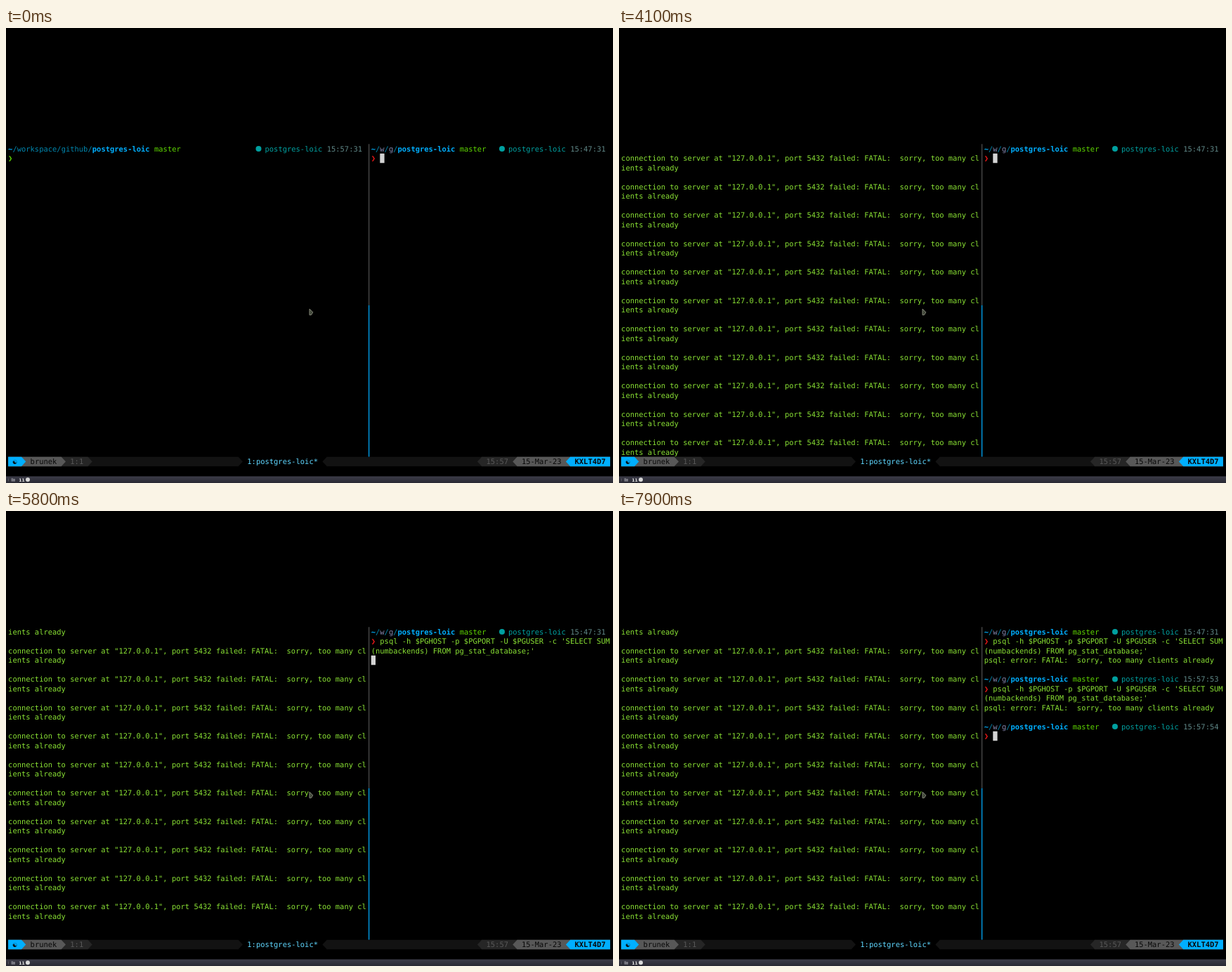
Animation, 864 px wide and 648 px high, one loop 8000 ms. Source, as an HTML page with a canvas:

```html
<!DOCTYPE html>
<html lang="en">
<head>
<meta charset="utf-8">
<title>Terminal session</title>
<style>
  html, body { margin: 0; width: 100%; height: 100%; overflow: hidden; background: #000; }
  canvas { display: block; width: 864px; height: 648px; }
</style>
</head>
<body>
<canvas id="stage" width="864" height="648"></canvas>
<script>
const ctx = document.getElementById('stage').getContext('2d');

// Character grid of the terminal
const CW = 6.3, RH = 13.5, X0 = 3.1, Y0 = 165.25;
const ROWS = 33, RIGHT = 82, STATUS = 33;
const SIZE = CW / 0.60205;
const FAMILY = '"DejaVu Sans Mono", "DejaVu Sans", monospace';
const LOOP = 8000, STEP = 100;

const C = {
  blue: '#00afff', path: '#0087af', short: '#8787af', branch: '#5fd700',
  env: '#00a0a0', clock: '#5f8787', text: '#8ae234', hint: '#666666',
  error: '#f01818', cursor: '#d3d3d3', rule: '#444444',
  g1: '#121212', g2: '#262626', g4: '#585858', ink: '#080808', tab: '#5fd7ff'
};

const MESSAGE = [
  'connection to server at "127.0.0.1", port 5432 failed: FATAL:  sorry, too many cl',
  'ients already',
  ''
];
const QUERY = ["psql -h $PGHOST -p $PGPORT -U $PGUSER -c 'SELECT SUM",
               "(numbackends) FROM pg_stat_database;'"];
const REFUSED = 'psql: error: FATAL:  sorry, too many clients already';

// Time in ms and number of output lines written by then
const OUTPUT = [[2700, 2], [4100, 169], [5300, 312], [6100, 408], [7100, 527], [7700, 600]];
// Blocks whose blank lines arrive late: first block, count
const LATE = [[90, 3], [127, 2], [130, 2]];

const colX = col => X0 + col * CW;
const rowY = row => Y0 + row * RH;

function text(col, row, str, color, bold) {
  ctx.font = (bold ? 'bold ' : '') + SIZE + 'px ' + FAMILY;
  ctx.fillStyle = color;
  ctx.fillText(str, colX(col), rowY(row) + 10.4);
}

function cursor(col, row) {
  ctx.fillStyle = C.cursor;
  ctx.fillRect(colX(col), rowY(row), CW, RH);
}

function fill(color, points) {
  ctx.fillStyle = color;
  ctx.beginPath();
  points.forEach(([x, y]) => ctx.lineTo(x, y));
  ctx.closePath();
  ctx.fill();
}

function disc(x, y, r, color) {
  ctx.fillStyle = color;
  ctx.beginPath();
  ctx.arc(x, y, r, 0, Math.PI * 2);
  ctx.fill();
}

function envMark(col, row, name, time) {
  disc(colX(col) + 3.6, rowY(row) + 6.75, 4, C.env);
  text(col + 2, row, name, C.env);
  text(col + 16, row, time, C.clock);
}

function leftPrompt() {
  text(0, 0, '~', C.blue, true);
  text(1, 0, '/workspace/github/', C.path);
  text(19, 0, 'postgres-loic', C.blue, true);
  text(33, 0, 'master', C.branch);
  envMark(56, 0, 'postgres-loic', '15:57:31');
  text(0, 1, '❯', C.branch);
}

function rightPrompt(row, time) {
  text(RIGHT, row, '~', C.blue, true);
  text(RIGHT + 1, row, '/ /', C.path);
  text(RIGHT + 2, row, 'w g', C.short);
  text(RIGHT + 5, row, '/', C.path);
  text(RIGHT + 6, row, 'postgres-loic', C.blue, true);
  text(RIGHT + 20, row, 'master', C.branch);
  envMark(RIGHT + 29, row, 'postgres-loic', time);
  text(RIGHT, row + 1, '❯', C.error);
}

function linesAt(t) {
  if (t <= OUTPUT[0][0]) return OUTPUT[0][1];
  for (let i = 1; i < OUTPUT.length; i++) {
    const [ta, a] = OUTPUT[i - 1], [tb, b] = OUTPUT[i];
    if (t <= tb) return Math.round(a + (b - a) * (t - ta) / (tb - ta));
  }
  return OUTPUT[OUTPUT.length - 1][1];
}

// Which part of the message (0, 1, 2 = blank) stands on an output line
function partOf(line) {
  const j = line - 2, block = Math.floor(j / 3);
  for (const [first, count] of LATE) {
    if (block >= first && block < first + count) {
      const q = j - first * 3;
      return q < count * 2 ? q % 2 : 2;
    }
  }
  return j % 3;
}

function leftPane(t, active) {
  const n = linesAt(t), top = Math.max(0, n - ROWS);
  if (top < 2) {
    if (top === 0) leftPrompt();
    else text(0, 0, '❯', C.branch);
    const row = 1 - top;
    if (t >= 2400) text(2, row, 'python main.py', C.text);
    else if (t >= 2000) {
      text(2, row, 'p', C.text);
      text(3, row, 'ython main.py', C.hint);
    }
  }
  for (let k = Math.max(2, top); k < n; k++) {
    const part = partOf(k);
    // A message on the last line is still to be written
    if (part < 2 && !(k === n - 1 && part === 0)) text(0, k - top, MESSAGE[part], C.text);
  }
  if (!active) return;
  if (t < 2000) cursor(2, 1);
  else if (t < 2400) {
    cursor(3, 1);
    text(3, 1, 'y', '#8a8a8a');
  } else if (t < 2500) cursor(16, 1);
  else cursor(0, Math.min(n - top, ROWS - 1));
}

const RUNS = [
  { row: 0, time: '15:47:31', shown: 0, typed: 4800, enter: 5800, reply: 5900 },
  { row: 5, time: '15:57:53', shown: 6000, typed: 6600, enter: 7500, reply: 7600 },
  { row: 10, time: '15:57:54', shown: 7700, typed: LOOP, enter: LOOP, reply: LOOP }
];

function rightPane(t, active) {
  let at = [2, 1];
  for (const { row, time, shown, typed, enter, reply } of RUNS) {
    if (t < shown) break;
    rightPrompt(row, time);
    at = [2, row + 1];
    if (t >= typed) {
      text(RIGHT + 2, row + 1, QUERY[0], C.text);
      text(RIGHT, row + 2, QUERY[1], C.text);
      at = [QUERY[1].length, row + 2];
    }
    if (t >= enter) at = [0, row + 3];
    if (t >= reply) {
      text(RIGHT, row + 3, REFUSED, C.text);
      at = [0, row + 4];
    }
  }
  if (active) cursor(RIGHT + at[0], at[1]);
}

function divider(leftActive) {
  const x = colX(81.5) - 0.7, mid = rowY(17);
  ctx.fillStyle = leftActive ? '#0095dc' : C.rule;
  ctx.fillRect(x, Y0, 1.5, mid - Y0);
  ctx.fillStyle = leftActive ? C.rule : '#0095dc';
  ctx.fillRect(x, mid, 1.5, rowY(ROWS) - mid);
}

// A bar from column a to b whose tip points outwards over one more column
function segment(a, b, color, tip) {
  const y = rowY(STATUS), mid = y + RH / 2, end = y + RH;
  const l = colX(a), r = colX(b);
  fill(color, tip > 0
    ? [[l, y], [r, y], [r + CW, mid], [r, end], [l, end]]
    : [[l, y], [l - CW, mid], [l, end], [r, end], [r, y]]);
}

function statusBar(leftActive) {
  segment(0, 52, C.g1, 1);
  segment(0, 18, C.g2, 1);
  segment(0, 12, C.g4, 1);
  segment(0, 3, C.blue, 1);
  segment(72, 136, C.g1, -1);
  segment(107, 136, C.g2, -1);
  segment(115, 136, C.g4, -1);
  segment(127, 136, C.blue, -1);

  ctx.font = 'bold 8px "DejaVu Sans", sans-serif';
  ctx.fillStyle = C.ink;
  ctx.fillText('☯', 9, rowY(STATUS) + 9.8);
  text(5, STATUS, 'brunek', C.ink);
  text(14, STATUS, leftActive ? '1:0' : '1:1', C.g4);
  text(54, STATUS, '1:postgres-loic*', C.tab);
  text(108, STATUS, '15:57', C.g4);
  text(116, STATUS, '15-Mar-23', C.ink);
  text(128, STATUS, 'KXLT4D7', C.ink, true);
}

function taskbar() {
  const shade = ctx.createLinearGradient(0, 638.5, 0, 648);
  shade.addColorStop(0, '#3c3c48');
  shade.addColorStop(1, '#292933');
  ctx.fillStyle = shade;
  ctx.fillRect(0, 638.5, 864, 9.5);
  ctx.fillStyle = '#55555f';
  ctx.fillRect(3, 641.5, 1, 4);
  ctx.fillStyle = '#777780';
  ctx.fillRect(7.5, 641.2, 2.5, 1);
  ctx.fillRect(7.5, 642, 5.5, 3.8);
  ctx.font = 'bold 6px "DejaVu Sans", sans-serif';
  ctx.fillStyle = '#e6e6e6';
  ctx.fillText('11', 18.3, 645.5);
  disc(31, 643.3, 3, '#d8d8d8');
}

function pointer() {
  const shape = [[432, 400.2], [436.8, 404.8], [434.6, 408.6], [432, 408.8]];
  fill('#3f4638', shape);
  ctx.strokeStyle = '#8d8f80';
  ctx.lineWidth = 0.9;
  ctx.stroke();
}

function draw(t) {
  const leftActive = t >= 900 && t < 3500;
  ctx.textRendering = 'geometricPrecision';
  ctx.fillStyle = '#000';
  ctx.fillRect(0, 0, 864, 648);
  leftPane(t, leftActive);
  rightPane(t, !leftActive);
  divider(leftActive);
  statusBar(leftActive);
  taskbar();
  pointer();
}

const start = performance.now();
let last = -1;
function tick() {
  const t = Math.floor((performance.now() - start) % LOOP / STEP) * STEP;
  if (t !== last) draw(last = t);
  requestAnimationFrame(tick);
}
tick();
</script>
</body>
</html>
```
